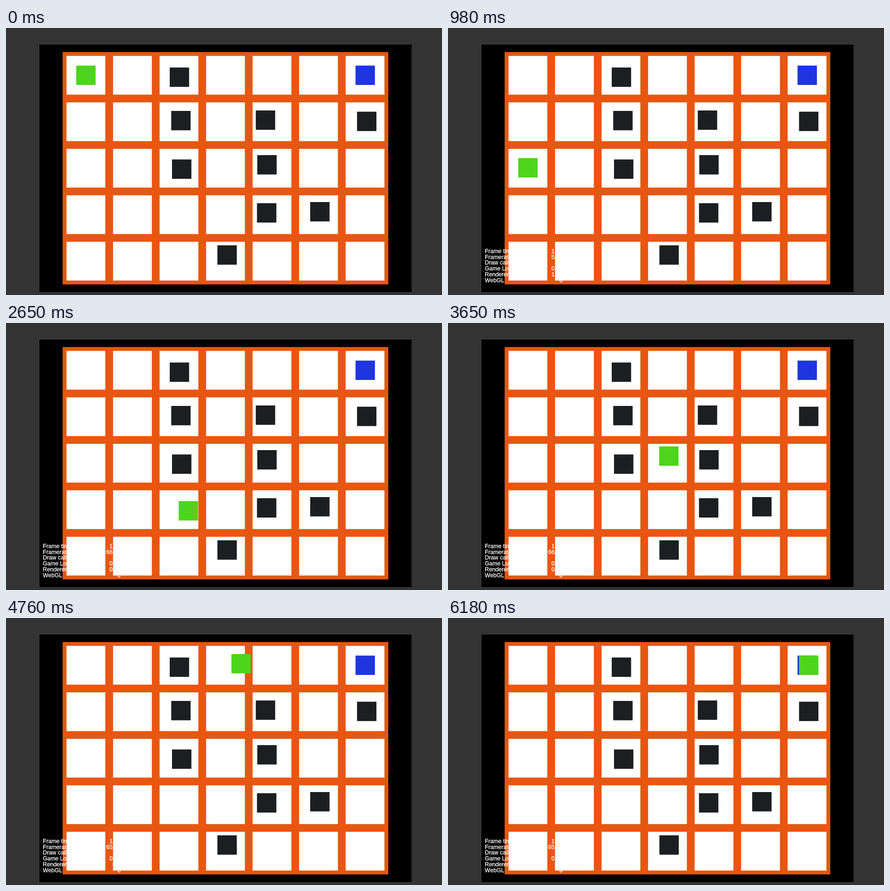
Write an HTML page with a canvas that moves like this. It is 956x586 px and loops after 6400 ms.

```html
<!DOCTYPE html>
<html lang="en">
<head>
<meta charset="utf-8">
<title>Grid path</title>
<style>
  html, body { margin: 0; width: 100%; height: 100%; overflow: hidden; background: #333; }
  canvas { display: block; }
</style>
</head>
<body>
<canvas id="stage" width="956" height="586"></canvas>
<script>
const ctx = document.getElementById('stage').getContext('2d');
const LOOP = 6400;
const STEP = 110.5;   // ms for which one pose is held
const LEAD = 15;      // ms by which the first pose is shorter

const COLS = 7, ROWS = 5;
const PITCH = 102, CELL = 85, SIZE = 42.5;
const LEFT = 124.25, TOP = 52.75;
const INSET = (PITCH - CELL) / 2;

// Corners of the walk: step, x, y.
const CORNERS = [
  [0, 154, 82.5], [9.2, 154, 290], [14.3, 258.7, 290], [18.6, 258.7, 391],
  [27.8, 463, 391], [41.3, 463, 79], [43, 494.3, 79], [44, 515, 82.5], [55.1, 769.7, 82.5]
];

const OBSTACLES = [
  [359, 86.7], [362.3, 182], [364, 288.5], [547.7, 181], [769.7, 183.7],
  [551, 279], [550.3, 384.5], [667, 382], [463.5, 477]
];

function walkerAt(step) {
  const next = CORNERS.findIndex(corner => corner[0] > step);
  if (next < 0) return CORNERS.at(-1).slice(1);
  const [s0, x0, y0] = CORNERS[next - 1];
  const [s1, x1, y1] = CORNERS[next];
  const k = (step - s0) / (s1 - s0);
  return [x0 + (x1 - x0) * k, y0 + (y1 - y0) * k];
}

function rect(color, x, y, w, h = w) {
  ctx.fillStyle = color;
  ctx.fillRect(x, y, w, h);
}

function drawBoard() {
  rect('#333333', 0, 0, 956, 586);
  rect('#474747', 72, 35, 818, 546);
  rect('#000000', 73, 36, 816.5, 544);
  rect('#e85612', LEFT, TOP, COLS * PITCH, ROWS * PITCH);
  for (let row = 0; row < ROWS; row++)
    for (let col = 0; col < COLS; col++)
      rect('#ffffff', LEFT + INSET + col * PITCH, TOP + INSET + row * PITCH, CELL);
  OBSTACLES.forEach(([x, y]) => rect('#1d1e22', x, y, SIZE));
  rect('#1f35e0', 766.4, 82.5, SIZE);
}

// Counters refresh twice a second; the frame rate swings in after a warm-up.
function readings(time) {
  const n = Math.floor((time - 1650) / 500);
  const warm = n >= 0;
  const fps = warm ? 65.7 - 3.2 * Math.cos(0.9 * n) * Math.exp(-0.35 * n) : 5.55;
  return {
    'Frame time (ms)': (100 / Math.max(fps, 55)).toFixed(2),
    'Framerate (FPS)': fps.toFixed(2),
    'Draw call': '3',
    'Game Logic (ms)': (22 / Math.max(fps, 55)).toFixed(2),
    'Renderer (ms)': warm ? (n < 6 ? '0.91' : '0.9') : '1.20',
    'WebGL': '0'
  };
}

function drawText(text, x, y, align) {
  ctx.textAlign = align;
  ctx.fillText(text, x, y);
  ctx.strokeText(text, x, y);
}

function drawStats(time) {
  ctx.font = '12.6px "Liberation Sans", Arial, sans-serif';
  ctx.fillStyle = ctx.strokeStyle = '#ffffff';
  ctx.lineWidth = 0.3;
  Object.entries(readings(time)).forEach(([label, value], i) => {
    const y = 493.8 + i * 12.75;
    drawText(label, 80.8, y, 'left');
    drawText(value, 251.2, y, 'right');
  });
}

function draw(now) {
  const time = now % LOOP;
  const step = Math.floor((time + LEAD) / STEP);
  drawBoard();
  rect('#4dd51b', ...walkerAt(step), SIZE);
  if (step > 0) drawStats(time);
}

let start;
function loop(now) {
  start ??= now;
  draw(Math.max(0, now - start));
  requestAnimationFrame(loop);
}
draw(0);
requestAnimationFrame(loop);
</script>
</body>
</html>
```
